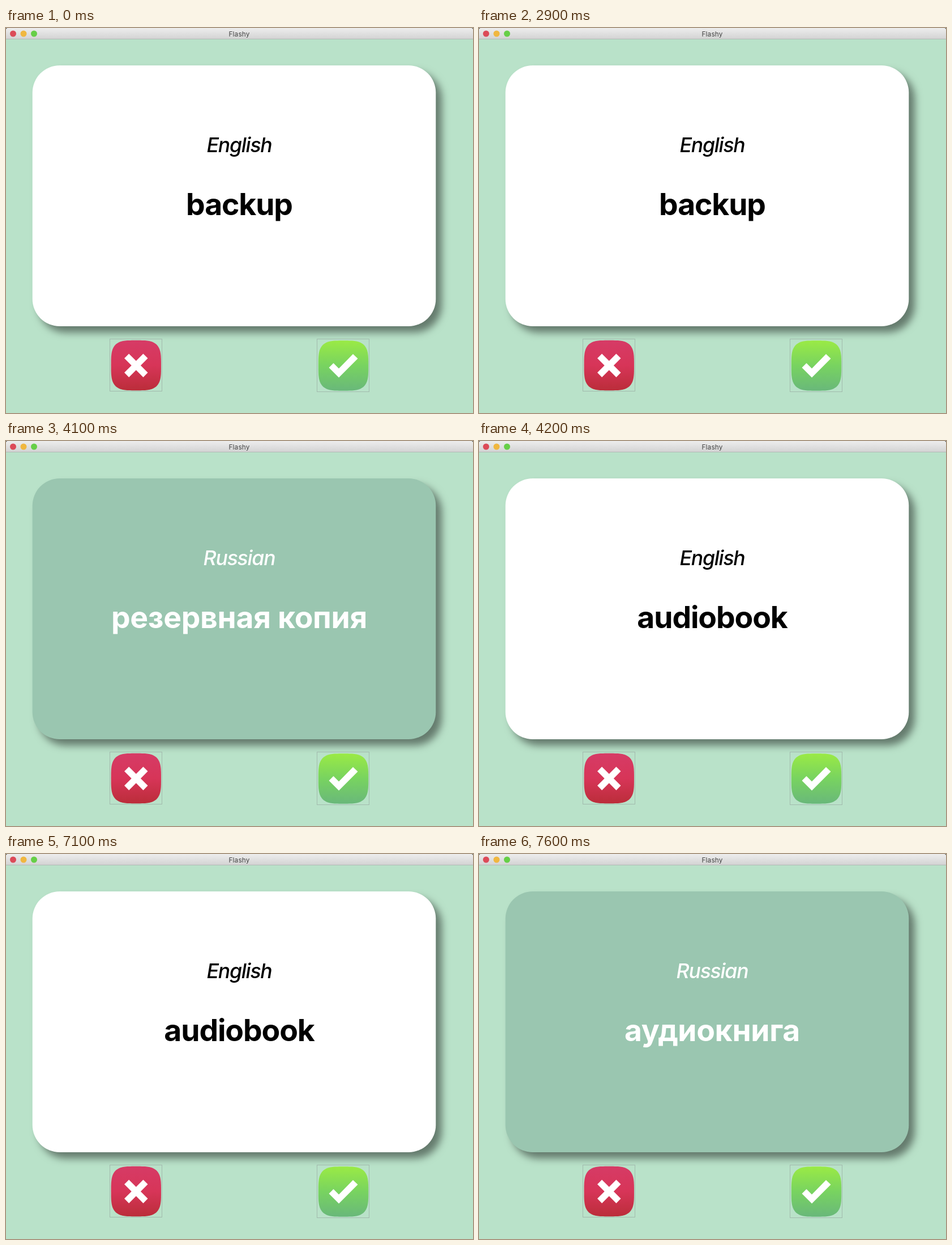
An HTML page with a canvas that plays this animation: 825 px wide and 679 px high, repeating every 7.7 s.

```html
<!DOCTYPE html>
<html lang="en">
<head>
<meta charset="utf-8">
<title>Flashy</title>
<style>
html, body { margin: 0; width: 100%; height: 100%; overflow: hidden; background: #b9e2c9; }
canvas { display: block; }
</style>
</head>
<body>
<canvas id="stage" width="825" height="679"></canvas>
<script>
const W = 825, H = 679, LOOP = 7700;
const ctx = document.getElementById('stage').getContext('2d');

// Each card is turned over three seconds after it appears.
const FLIP = 3000;
const cards = [
  { at: 0, front: 'backup', back: 'резервная копия' },
  { at: 4200, front: 'audiobook', back: 'аудиокнига' }
];
const sides = {
  front: { label: 'English', fill: '#fff', ink: '#000', spacing: '-1.1px' },
  back: { label: 'Russian', fill: '#9ac6b0', ink: '#fff', spacing: '-0.3px' }
};

function gradient(y0, y1, ...colors) {
  const g = ctx.createLinearGradient(0, y0, 0, y1);
  colors.forEach((c, i) => g.addColorStop(i / (colors.length - 1), c));
  return g;
}

function text(str, y, font, color, spacing) {
  ctx.font = font + ' Inter, "Noto Sans", sans-serif';
  ctx.letterSpacing = spacing;
  ctx.fillStyle = color;
  ctx.textAlign = 'center';
  ctx.fillText(str, 412, y);
}

function polygon(points) {
  ctx.beginPath();
  points.forEach(([x, y]) => ctx.lineTo(x, y));
  ctx.closePath();
  ctx.fill();
}

function dot(x, color) {
  ctx.beginPath();
  ctx.arc(x, 10, 5.5, 0, Math.PI * 2);
  ctx.fillStyle = color;
  ctx.fill();
}

function squircle(cx, cy, r) {
  const bend = v => Math.sign(v) * Math.abs(v) ** 0.56;
  ctx.beginPath();
  for (let i = 0; i < 160; i++) {
    const a = i / 80 * Math.PI;
    ctx.lineTo(cx + r * bend(Math.cos(a)), cy + r * bend(Math.sin(a)));
  }
  ctx.closePath();
  ctx.fill();
}

function button(cx, cy, h, colors) {
  ctx.strokeStyle = '#a2baad';
  ctx.lineWidth = 1;
  ctx.strokeRect(Math.round(cx) - 46.5, 548.5, 92, h);
  ctx.fillStyle = gradient(cy - 44, cy + 44, ...colors);
  squircle(cx, cy, 44.2);
  ctx.fillStyle = '#fff';
}

function titleBar() {
  ctx.fillStyle = '#222b27';
  ctx.fillRect(0, 0, W, 6);
  ctx.fillStyle = gradient(0, 20, '#ededed', '#d2d2d2');
  ctx.beginPath();
  ctx.roundRect(0, 0, W, 20, [3, 3, 0, 0]);
  ctx.fill();
  ctx.fillStyle = '#b3b9b5';
  ctx.fillRect(0, 19, W, 1);
  dot(12.5, '#dc4a58');
  dot(31, '#f0b73f');
  dot(49.5, '#66cf47');
  text('Flashy', 14.5, '400 11.8px', '#444', '0.15px');
}

function buttons() {
  button(229.8, 595, 92, ['#d63b66', '#d73558', '#bb2d3a']);
  ctx.save();
  ctx.translate(229.8, 595.2);
  ctx.rotate(Math.PI / 4);
  ctx.fillRect(-23.6, -5.7, 47.2, 11.4);
  ctx.fillRect(-5.7, -23.6, 11.4, 47.2);
  ctx.restore();

  button(596, 595.5, 93, ['#9aea45', '#78d360', '#69b87a']);
  polygon([[570.5, 599], [578.5, 591], [588, 600.5], [613, 575], [621.5, 583], [588, 616.5]]);
}

function cardFace(card, side) {
  const { label, fill, ink, spacing } = sides[side];
  ctx.save();
  ctx.shadowColor = 'rgba(0, 0, 0, 0.46)';
  ctx.shadowBlur = 14;
  ctx.shadowOffsetX = 10.5;
  ctx.shadowOffsetY = 11;
  ctx.fillStyle = fill;
  ctx.beginPath();
  ctx.roundRect(46.7, 66, 712.6, 460, 48);
  ctx.fill();
  ctx.restore();

  text(label, 219, 'italic 500 35.6px', ink, '-1.2px');
  text(card[side], 329.5, '700 53.4px', ink, spacing);
}

function draw(t) {
  const card = t < cards[1].at ? cards[0] : cards[1];
  ctx.fillStyle = '#b9e2c9';
  ctx.fillRect(0, 0, W, H);
  titleBar();
  cardFace(card, t - card.at < FLIP ? 'front' : 'back');
  buttons();
}

const start = performance.now();
function tick() {
  draw((performance.now() - start) % LOOP);
  requestAnimationFrame(tick);
}
tick();
</script>
</body>
</html>
```
